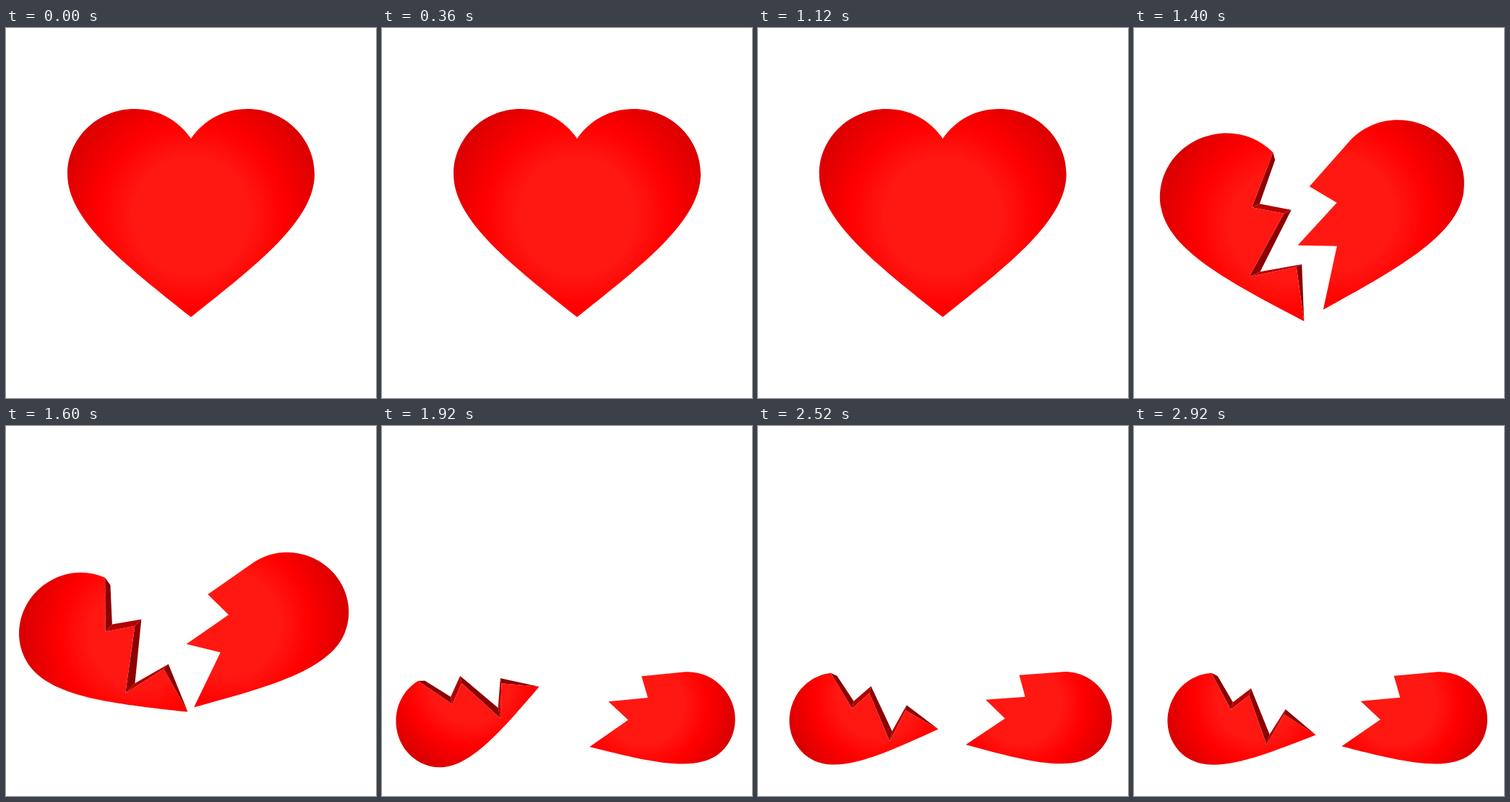
Recreate the animation shown at these times as an HTML page with a canvas. Size 512x512 px, loop 3200 ms.

```html
<!DOCTYPE html>
<html lang="en">
<head>
<meta charset="utf-8">
<title>Breaking heart</title>
<style>
  html, body { margin: 0; width: 100%; height: 100%; overflow: hidden; background: #fff; }
  canvas { display: block; width: 100vmin; height: 100vmin; }
</style>
</head>
<body>
<canvas id="stage" width="512" height="512"></canvas>
<script>
const ctx = document.getElementById('stage').getContext('2d');
const LOOP = 3200, STEP = 40, LAST = 2920;
const BREAK = 1160, LAND = 1920;
const NOTCH = { x: 256, y: 153 }, LOBE = { x: 90, y: 50 };

// Each half falls with its own easing powers, then rocks to rest.
// Crack corners run from notch to tip, relative to the notch.
const left = {
  side: -1, rest: { x: 104.7, y: 411.8, angle: -59.9 },
  slide: 2.25, drop: 1.68, turn: 1.89,
  rock: s => -27.4 * Math.exp(-.0038 * s) * Math.cos(Math.PI * s / 320),
  crack: [[0, 0], [-44, 72], [0, 89], [-68, 171], [3, 170], [0, 247]]
};
const right = {
  side: 1, rest: { x: 430.4, y: 409.5, angle: 51.9 },
  slide: 1.17, drop: 2.42, turn: 1.55,
  rock: s => 24 * Math.exp(-.0045 * s) * Math.sin(Math.PI * s / 220),
  crack: [[0, 0], [-48, 75], [-5.5, 92], [-49, 160], [5.3, 151.4], [0, 247]]
};

const mix = (a, b, k) => a + (b - a) * k;

// Two strong swings, then weaker ones that die out
function shake(t) {
  const size = t < 576 ? 14 : 14 * (1 - t / BREAK);
  return size * Math.sin(Math.PI * t / 144);
}

// Lobe centre, angle and scale of a half
function pose(half, t) {
  const p = Math.min(1, (t - BREAK + 10) / (LAND - BREAK + 10));
  const swing = half.rock(Math.max(0, t - LAND));
  const { x, y, angle } = half.rest;
  return {
    x: mix(NOTCH.x + LOBE.x * half.side, x + .87 * swing, 1 - (1 - p) ** half.slide),
    y: mix(NOTCH.y + LOBE.y, y + .005 * swing * swing, p ** half.drop),
    angle: mix(0, angle + swing, p ** half.turn),
    scale: mix(1, .68, p ** 1.87)
  };
}

// Outer edge of one half, from notch to tip
function edge(w) {
  ctx.moveTo(0, 0);
  ctx.bezierCurveTo(18 * w, -26, 46 * w, -41, 78 * w, -41);
  ctx.bezierCurveTo(130 * w, -41, 171 * w, 0, 171 * w, 49);
  ctx.bezierCurveTo(171 * w, 113, 92 * w, 174, 0, 247);
}

const shade = ctx.createRadialGradient(0, 107, 0, 0, 107, 200);
shade.addColorStop(.4, '#ff1812');
shade.addColorStop(.64, '#ff0000');
shade.addColorStop(.95, '#d80000');

function drawWhole(dx) {
  ctx.save();
  ctx.translate(NOTCH.x + dx, NOTCH.y);
  ctx.fillStyle = shade;
  ctx.beginPath();
  edge(1);
  edge(-1);
  ctx.fill('nonzero');
  ctx.restore();
}

// Dark walls of the crack; inner corners reach deepest, the tip has none
function drawWalls(crack, open) {
  const reach = [0, 1, .95, 1.4, .7, 0];
  const back = crack.map(([x, y], i) => i
    ? [x + 15 * reach[i] * open, y - 4 * reach[i] * open]
    : [x + open, y + 14 * open]);
  for (let i = 0; i < 5; i++) {
    ctx.fillStyle = i % 2 ? '#b20000' : '#8c0000';
    ctx.beginPath();
    for (const p of [crack[i], back[i], back[i + 1], crack[i + 1]]) ctx.lineTo(...p);
    ctx.fill();
  }
}

function drawHalf(half, t) {
  const { x, y, angle, scale } = pose(half, t);
  const open = Math.min(1, (t - BREAK) / 300);
  // Both cracks start on a shared line so that the halves fit together
  const crack = half.crack.map((p, i) => p.map((v, k) =>
    mix((left.crack[i][k] + right.crack[i][k]) / 2, v, open)));
  ctx.save();
  ctx.translate(x, y);
  ctx.rotate(angle * Math.PI / 180);
  ctx.scale(scale, scale);
  ctx.translate(-LOBE.x * half.side, -LOBE.y);
  if (half === left) drawWalls(crack, open);
  ctx.fillStyle = shade;
  ctx.beginPath();
  edge(half.side * (1 + .015 * open));
  for (const p of crack.reverse()) ctx.lineTo(...p);
  ctx.fill();
  ctx.restore();
}

const start = performance.now();
function draw() {
  const now = Math.max(0, performance.now() - start) % LOOP;
  const t = Math.min(LAST, Math.floor(now / STEP) * STEP);
  ctx.fillStyle = '#fff';
  ctx.fillRect(0, 0, 512, 512);
  if (t < BREAK) {
    drawWhole(shake(t));
  } else {
    drawHalf(left, t);
    drawHalf(right, t);
  }
  requestAnimationFrame(draw);
}
draw();
</script>
</body>
</html>
```
